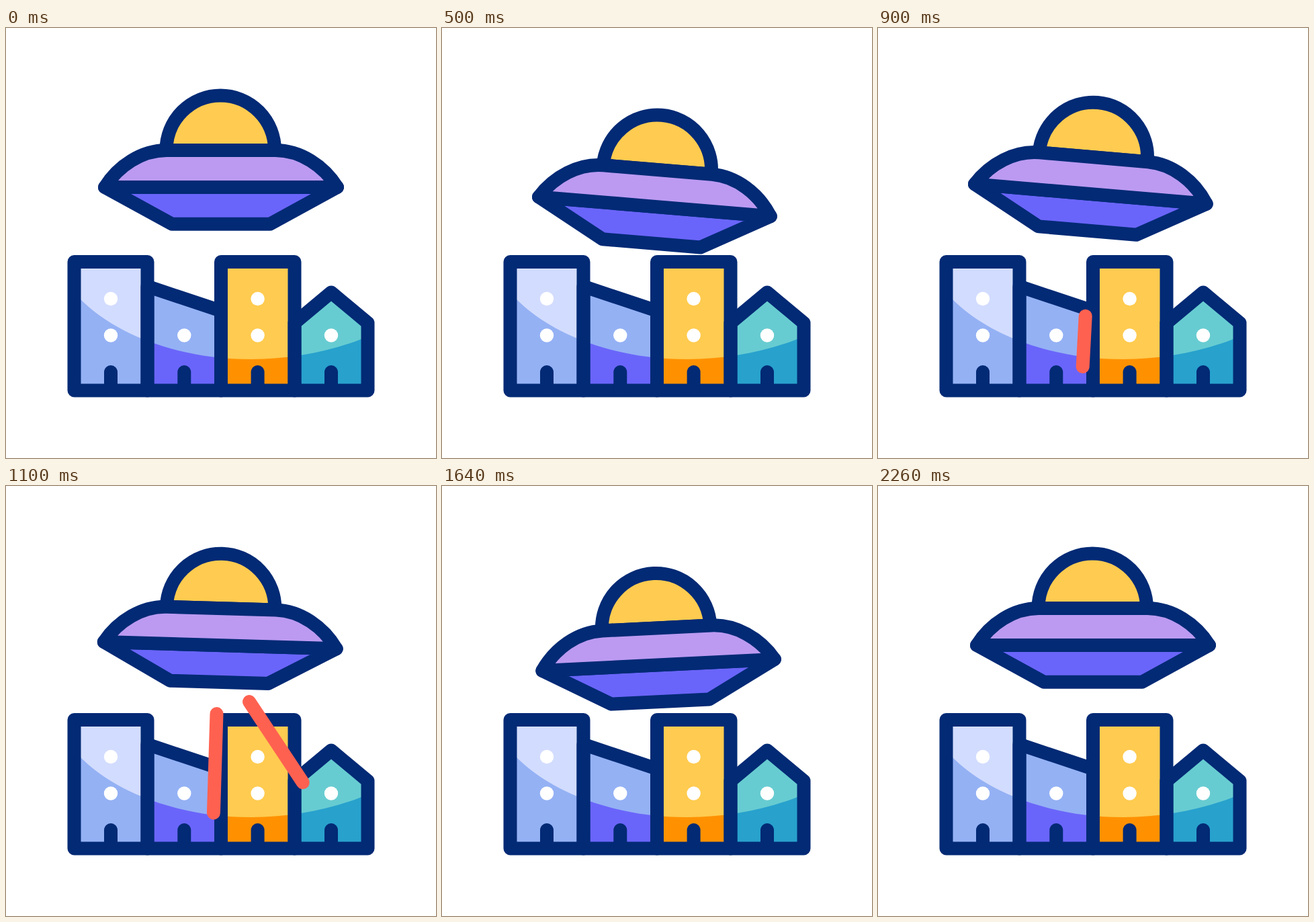
An HTML page for the animation above (2400 ms loop, 640 px wide and 640 px high).

```html
<!DOCTYPE html>
<html lang="en">
<head>
<meta charset="utf-8">
<title>City and saucer</title>
<style>
html, body { margin: 0; width: 100%; height: 100%; overflow: hidden; background: #fff; }
svg { display: block; width: 100vw; height: 100vh; }
.ink { fill: none; stroke: #022a75; stroke-width: 20; stroke-linecap: round; stroke-linejoin: round; }
#beams { stroke: #ff6150; stroke-width: 20; stroke-linecap: round; }
</style>
</head>
<body>
<svg viewBox="0 0 640 640">
  <defs>
    <clipPath id="low"><path d="M100 393L111 404C165 458 260 493 365 493C425 493 480 482 529 463L545 457V545H100Z"/></clipPath>
    <path id="a" d="M101.5 348H210.5V539.5H101.5Z"/>
    <path id="b" d="M210.5 384.5L320 421V539.5H210.5Z"/>
    <path id="c" d="M320 348H429.5V539.5H320Z"/>
    <path id="d" d="M429.5 439L484 393.5L538.5 439V539.5H429.5Z"/>
  </defs>
  <g>
    <use href="#a" fill="#d2dcfe"/><use href="#b" fill="#94b1f4"/>
    <use href="#c" fill="#ffcb50"/><use href="#d" fill="#67ccd1"/>
  </g>
  <g clip-path="url(#low)">
    <use href="#a" fill="#94b1f4"/><use href="#b" fill="#6a65fa"/>
    <use href="#c" fill="#ff9100"/><use href="#d" fill="#28a1cd"/>
  </g>
  <g class="ink">
    <use href="#a"/><use href="#b"/><use href="#c"/><use href="#d"/>
    <path d="M156 512V539M265.3 512V539M374.6 512V539M484 512V539"/>
  </g>
  <g fill="#fff">
    <circle cx="156" cy="403" r="10.2"/><circle cx="156" cy="457.5" r="10.2"/>
    <circle cx="265.3" cy="457.5" r="10.2"/><circle cx="484" cy="457.5" r="10.2"/>
    <circle cx="374.6" cy="403" r="10.2"/><circle cx="374.6" cy="457.5" r="10.2"/>
  </g>
  <g id="beams"></g>
  <g id="ufo" class="ink">
    <path fill="#ffcb50" d="M238.5 182A80.7 81.5 0 0 1 400 182Z"/>
    <path fill="#6a65fa" d="M147 237L247 291.7H393L493 237Z"/>
    <path fill="#bc9af1" d="M147 237C167 205 202 182 239 182H401C438 182 473 205 493 237Z"/>
  </g>
</svg>
<script>
const LOOP = 2400, PHASE = 160;

// [time, value]
const BOB = [[0, 0], [550, 29.7], [1130, 0], [1670, 29.7], [2260, 0]];
const TILT = [[0, 0], [720, 6.15], [1500, -3.1], [2260, 0]];

// [start time, x1, y1, x2, y2]
const BEAMS = [
  [78, 275, 330, 191, 516],
  [94, 339, 325, 369, 536],
  [654, 313.5, 339, 304.7, 504],
  [958, 313.5, 339, 308.4, 504],
  [958, 362, 321, 451.3, 455.5],
  [1180, 341, 325, 366, 530],
  [1831, 313.5, 339, 300.4, 504]
];

const ufo = document.getElementById('ufo');
const group = document.getElementById('beams');
const lines = BEAMS.map(() => group.appendChild(
  document.createElementNS('http://www.w3.org/2000/svg', 'line')));

const clamp = v => Math.min(1, Math.max(0, v));
const mix = (a, b, u) => a + (b - a) * u;

function track(keys, t) {
  for (let i = 1; i < keys.length; i++) {
    const [t0, v0] = keys[i - 1], [t1, v1] = keys[i];
    if (t < t1) {
      const u = (t - t0) / (t1 - t0);
      return mix(v0, v1, u * u * (3 - 2 * u));
    }
  }
  return keys[keys.length - 1][1];
}

// A beam grows out from its origin, then its tail catches up.
function drawBeam(line, [start, x1, y1, x2, y2], t) {
  const u = (t - start) / PHASE;
  const head = clamp(u), tail = clamp(u - 1);
  line.style.display = u > 0 && u < 2 ? '' : 'none';
  line.setAttribute('x1', mix(x1, x2, tail));
  line.setAttribute('y1', mix(y1, y2, tail));
  line.setAttribute('x2', mix(x1, x2, head));
  line.setAttribute('y2', mix(y1, y2, head));
}

function draw(t) {
  ufo.setAttribute('transform',
    `translate(0 ${track(BOB, t)}) rotate(${track(TILT, t)} 320 194)`);
  lines.forEach((line, i) => drawBeam(line, BEAMS[i], t));
}

const begin = performance.now();
function tick() {
  draw((performance.now() - begin) % LOOP);
  requestAnimationFrame(tick);
}
draw(0);
requestAnimationFrame(tick);
</script>
</body>
</html>
```
